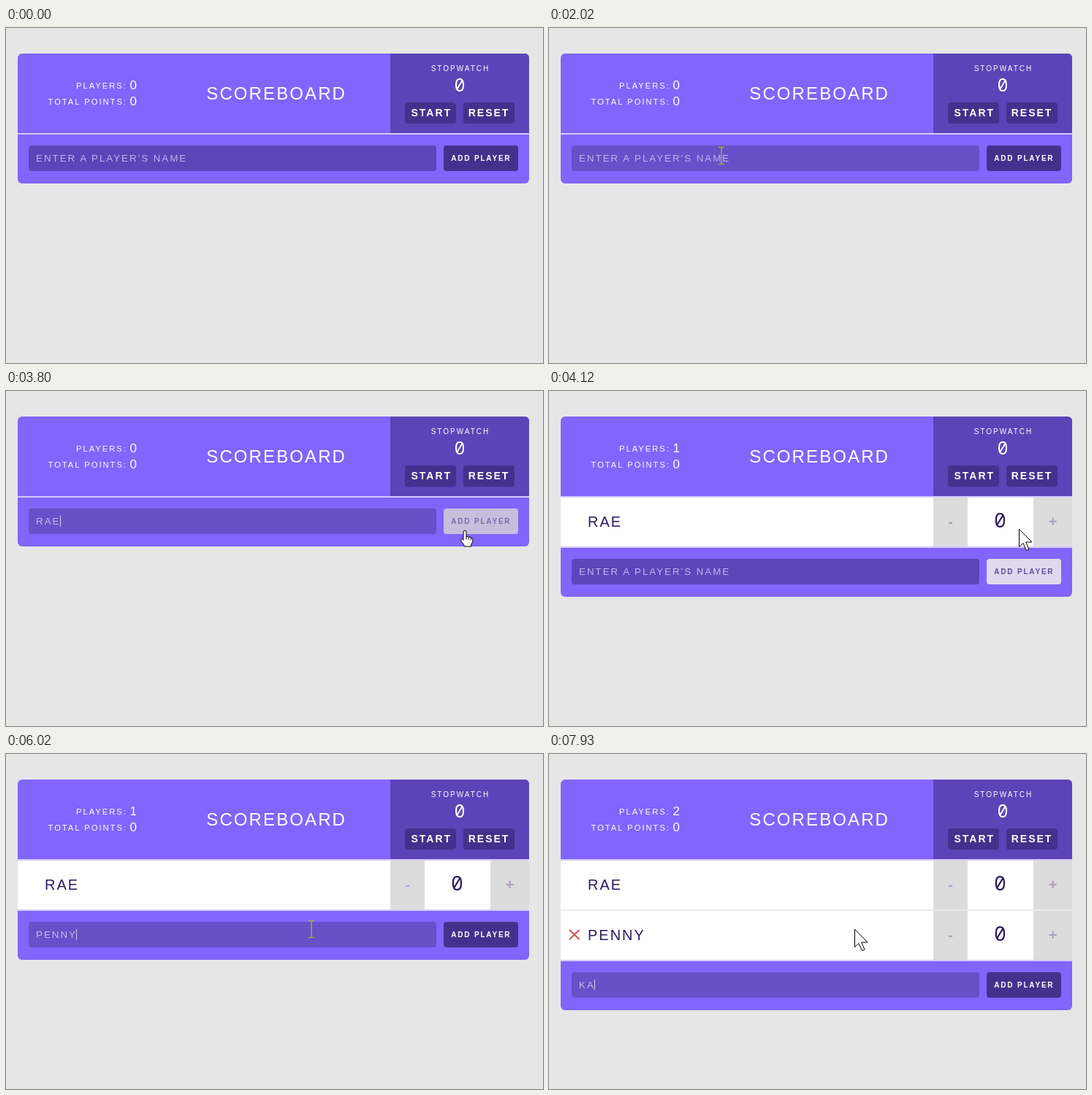
Animation, 735 px wide and 459 px high, one loop 8000 ms. Source, as an HTML page:

```html
<!DOCTYPE html>
<html lang="en">
<head>
<meta charset="utf-8">
<title>Scoreboard</title>
<style>
  html, body { margin: 0; width: 100%; height: 100%; overflow: hidden; background: #e6e6e6; }
  svg { display: block; width: 735px; height: 459px; }
  text { font-family: "Liberation Sans", Arial, sans-serif; fill: #fff; letter-spacing: 2px; white-space: pre; }
  .stat { font-size: 11.2px; }
  .count { font-size: 17px; letter-spacing: 0; }
  .title { font-size: 24px; letter-spacing: 2.1px; }
  .mono { font-family: "Noto Sans Mono", monospace; letter-spacing: 0; text-anchor: middle; }
  .label { font-size: 10px; }
  .btn { font-size: 14px; font-weight: bold; }
  .add { font-size: 10px; font-weight: bold; letter-spacing: 1.8px; }
  .field { font-size: 13.33px; }
  .row text { fill: #2f1a63; }
  .row .name { font-size: 20px; }
  .row .sign { font-size: 20px; font-weight: bold; letter-spacing: 0; text-anchor: middle; fill: #b0a0c0; }
</style>
</head>
<body>
<svg viewBox="0 0 735 459">
  <defs>
    <clipPath id="clip"><rect id="card" x="16" y="35" width="700" height="178" rx="6"/></clipPath>
  </defs>
  <g clip-path="url(#clip)">
    <rect x="16" y="35" width="700" height="424" fill="#8165fc"/>
    <rect x="526" y="35" width="190" height="109" fill="#5b44b8"/>
    <text class="stat" x="96" y="83">PLAYERS:</text>
    <text class="stat" x="57.5" y="105">TOTAL POINTS:</text>
    <text class="count" id="players" x="169.5" y="84">0</text>
    <text class="count" x="169.5" y="106">0</text>
    <text class="title" x="274.3" y="98">SCOREBOARD</text>
    <text class="label" x="581.7" y="59">STOPWATCH</text>
    <text class="mono" x="621" y="87" font-size="25" font-weight="500">0</text>
    <rect x="546" y="102" width="70" height="29" rx="4" fill="#44318d"/>
    <rect x="626" y="102" width="70" height="29" rx="4" fill="#44318d"/>
    <text class="btn" x="554.5" y="121">START</text>
    <text class="btn" x="632.7" y="121">RESET</text>
    <g id="rows"></g>
    <rect x="16" y="144" width="700" height="2" fill="#d3c9fb"/>
    <g id="form">
      <rect x="16" y="144" width="700" height="2" fill="#d3c9fb"/>
      <rect id="input" x="31" y="161" width="558" height="35" rx="4"/>
      <text id="value" class="field" x="41" y="183"></text>
      <rect id="caret" y="171" width="1" height="15" fill="#d6ccf4"/>
      <rect id="addBox" x="599" y="161" width="102" height="35" rx="4"/>
      <text id="addText" class="add" x="609.3" y="182">ADD PLAYER</text>
    </g>
  </g>
  <g id="pointer" stroke-linejoin="round" stroke-linecap="round">
    <path id="arrow" d="M.5.5V24.5L6 19.5L10.5 29.5L14 28L9.7 18H17.5Z" fill="#fff" stroke="#000"/>
    <g id="hand" fill="#fff" stroke="#000">
      <path d="M-2 13V2Q-2 .3 0 .3Q2 .3 2 2V9Q4 7.3 5.3 9.3Q7.3 8.2 8.4 10.2Q10.8 9.8 10.8 12V15.5L8.8 19V22H-1V20L-5 14.5Q-6.2 11.4-4 11.4Z"/>
      <path d="M2 9V12M5.3 9.5V12.5M8.4 10.5V13" fill="none"/>
    </g>
    <path id="beam" d="M-3.5-11.5H-1.5Q0-11.5 0-10Q0-11.5 1.5-11.5H3.5M0-10V10M-3.5 11.5H-1.5Q0 11.5 0 10Q0 11.5 1.5 11.5H3.5" fill="none" stroke="#a5b034" stroke-width="1.4"/>
  </g>
</svg>
<script>
const LOOP = 8000, ROW = 69;
const HINT = "ENTER A PLAYER'S NAME";
const names = [[4110, "RAE"], [6350, "PENNY"]];

// [time, text in the field]
const typing = [
  [0, ""], [2090, "R"], [2150, "RA"], [2300, "RAE"], [4110, ""],
  [5370, "P"], [5580, "PE"], [5740, "PEN"], [5840, "PENN"], [6020, "PENNY"],
  [6350, ""], [7700, "K"], [7930, "KA"]
];
const caretOn = [[1450, 2020], [2090, 2820], [3350, 3880], [4880, 6910], [7420, LOOP]];

// [time, x, y] of the pointer's hot spot
const path = [
  [390, 638, 445], [550, 590, 417], [800, 400, 287], [950, 290, 212], [1120, 236, 175],
  [3510, 236, 175], [3620, 420, 180], [3716, 600, 188], [3800, 628, 191], [3900, 644, 189],
  [4120, 644, 189], [4250, 520, 205], [4330, 438, 217], [4360, 432, 219], [4500, 422, 232],
  [4720, 418, 240]
];

const $ = id => document.getElementById(id);
const clamp = v => Math.max(0, Math.min(1, v));
const show = (el, on) => el.setAttribute("visibility", on ? "visible" : "hidden");
const shift = (el, x, y) => el.setAttribute("transform", `translate(${x} ${y})`);
const inside = (p, x, y, w, h) => p.x >= x && p.x < x + w && p.y >= y && p.y < y + h;

function fade(t, start, end, length) {
  const ease = v => 1 - (1 - clamp(v)) ** 2.4;
  return ease((t - start) / length) * (1 - ease((t - end) / length));
}

function mix(a, b, k) {
  return `rgb(${a.map((v, i) => Math.round(v + (b[i] - v) * k)).join()})`;
}

function pointerAt(t) {
  const i = path.findIndex(p => p[0] > t);
  const b = path[i < 0 ? path.length - 1 : i];
  const a = path[i < 0 ? path.length - 1 : Math.max(0, i - 1)];
  const k = a === b ? 0 : clamp((t - a[0]) / (b[0] - a[0]));
  return { x: a[1] + (b[1] - a[1]) * k, y: a[2] + (b[2] - a[2]) * k };
}

$("rows").innerHTML = names.map(([, name], i) => `
  <g class="row" transform="translate(0 ${i * ROW})">
    <rect x="16" y="144" width="700" height="69" fill="#ebebed"/>
    <rect x="16" y="146" width="700" height="67" fill="#fff"/>
    <rect x="526" y="146" width="47" height="67" fill="#dcdcdc"/>
    <rect x="663" y="146" width="53" height="67" fill="#dcdcdc"/>
    <path class="remove" d="M28 172L41.500 185M41.500 172L28 185" stroke="#d55a66" stroke-width="2.4"/>
    <text class="name" x="53" y="186">${name}</text>
    <text class="sign" x="549.7" y="186">-</text>
    <text class="mono" x="617.5" y="187" font-size="28">0</text>
    <text class="sign" x="689.5" y="186">+</text>
  </g>`).join("");
const rows = [...document.querySelectorAll(".row")];
const removes = rows.map(r => r.querySelector(".remove"));
const firstMinus = rows[0].querySelector(".sign");

function draw(t) {
  const n = names.filter(p => t >= p[0]).length;
  const dy = n * ROW;
  const pos = pointerAt(t);

  $("players").textContent = n;
  $("card").setAttribute("height", 178 + dy);
  shift($("form"), 0, dy);
  rows.forEach((row, i) => {
    show(row, i < n);
    show(removes[i], i < n && inside(pos, 16, 146 + i * ROW, 510, 67));
  });
  firstMinus.style.fill = t < 4250 ? "#b0a0c0" : "#aca2d8";

  const focus = Math.max(fade(t, 1430, 4000, 140), fade(t, 4860, LOOP, 130));
  $("input").setAttribute("fill", mix([92, 69, 185], [103, 80, 200], focus));
  const text = typing.filter(s => s[0] <= t).pop()[1];
  const value = $("value");
  value.textContent = text || HINT;
  value.style.fill = text ? "#c8bbf0" : "#c2b3f4";
  const width = text ? value.getComputedTextLength() : 0;
  $("caret").setAttribute("x", Math.round(41 + width - (text ? 0.5 : 0)));
  show($("caret"), caretOn.some(([a, b]) => t >= a && t < b));

  const hover = fade(t, 3716, 4110, 200);
  $("addBox").setAttribute("fill", mix([68, 49, 141], [244, 242, 250], hover));
  $("addText").style.fill = mix([255, 255, 255], [74, 53, 145], hover);

  const seen = t >= 390;
  const beam = inside(pos, 31, 161 + dy, 558, 35);
  const hand = inside(pos, 599, 161 + dy, 102, 35);
  shift($("pointer"), Math.round(pos.x), Math.round(pos.y));
  show($("beam"), seen && beam);
  show($("hand"), seen && hand);
  show($("arrow"), seen && !beam && !hand);
}

const begin = performance.now();
function tick() {
  draw((performance.now() - begin) % LOOP);
  requestAnimationFrame(tick);
}
tick();
</script>
</body>
</html>
```
